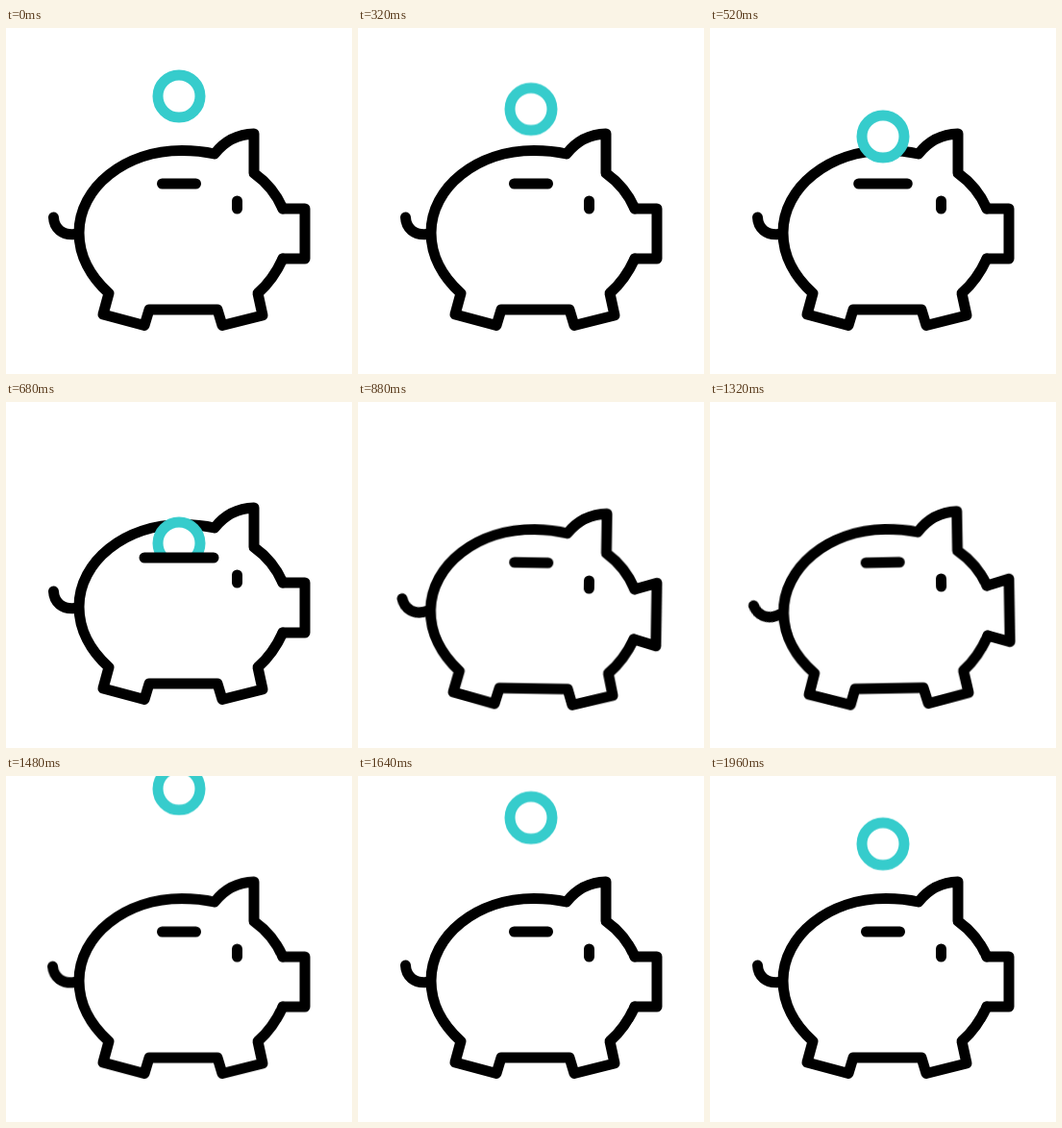
These frames come from a looping animation (360x360 px, 2000 ms). An HTML page:

```html
<!DOCTYPE html>
<html lang="en">
<head>
<meta charset="utf-8">
<title>Piggy bank</title>
<style>
  html, body { margin: 0; width: 100%; height: 100%; overflow: hidden; background: #fff; }
  svg { display: block; width: 100%; height: 100%; }
  .ink { fill: none; stroke: #000; stroke-width: 11; stroke-linecap: round; stroke-linejoin: round; }
  .coin circle { fill: #fff; stroke: #36cccc; stroke-width: 11; }

  .dip, .tilt, .tail, .snout, .slot, .coin circle {
    animation: 2s infinite cubic-bezier(.37, 0, .63, 1);
  }
  .dip { animation-name: dip; }
  .tilt { animation-name: tilt; transform-origin: 180px 180px; }
  .tail { animation-name: wag; transform-origin: 71px 215px; }
  .snout { animation-name: flare; }
  .slot { animation-name: open; }
  .coin circle { animation-name: drop; }

  @keyframes dip {
    0%, 35%, 75%, 100% { transform: translateY(0); }
    55% { transform: translateY(12px); }
  }
  @keyframes tilt {
    0%, 36%, 72%, 100% { transform: rotate(0deg); }
    43% { transform: rotate(.95deg); }
    59% { transform: rotate(-2.3deg); }
  }
  @keyframes wag {
    0%, 36%, 77%, 100% { transform: rotate(0deg); }
    53% { transform: rotate(-25deg); animation-timing-function: cubic-bezier(.7, 0, .8, 1); }
  }
  @keyframes flare {
    0%, 36%, 74%, 100% { d: path("M288 188 L311 188 L311 240 L288 240"); }
    48%, 62% { d: path("M288 188 L311 179 L311 249 L288 240"); }
  }
  @keyframes open {
    0%, 22%, 44%, 100% { d: path("M162.5 162 L197.5 162"); }
    31%, 37% { d: path("M144 162 L216 162"); }
  }
  /* Falls with gravity, then a new coin glides in from above. */
  @keyframes drop {
    0% { transform: translateY(0); }
    3% { transform: translateY(0); animation-timing-function: cubic-bezier(.333, 0, .667, .333); }
    42% { transform: translateY(120px); animation-timing-function: step-end; }
    66% { transform: translateY(-99px); animation-timing-function: cubic-bezier(.333, .667, .667, 1); }
    100% { transform: translateY(0); }
  }
</style>
</head>
<body>
<svg viewBox="0 0 360 360">
  <clipPath id="above"><rect width="360" height="162"/></clipPath>
  <g class="dip"><g class="tilt ink">
    <path class="tail" d="M49.5 197 C50 208 58 216 72 214.5"/>
    <path d="M288 188 C282 174 272 161 258 151 L258 110 C241 110.5 227 118 217 131
      C206 128.5 195 127.5 183 127.5 C124 127.5 76 165.5 76 213 C76 237 88 259 107 276
      L101 298 L144 309.5 L149 293 L220 293 L225 309.5 L267 299 L262 276 Q278 262 288 240"/>
    <path class="snout" d="M288 188 L311 188 L311 240 L288 240"/>
    <path d="M240.5 180 V188"/>
  </g></g>
  <g class="coin" clip-path="url(#above)"><circle cx="180" cy="71" r="22"/></g>
  <g class="dip"><g class="tilt ink">
    <path class="slot" d="M162.5 162 L197.5 162"/>
  </g></g>
</svg>
</body>
</html>
```
